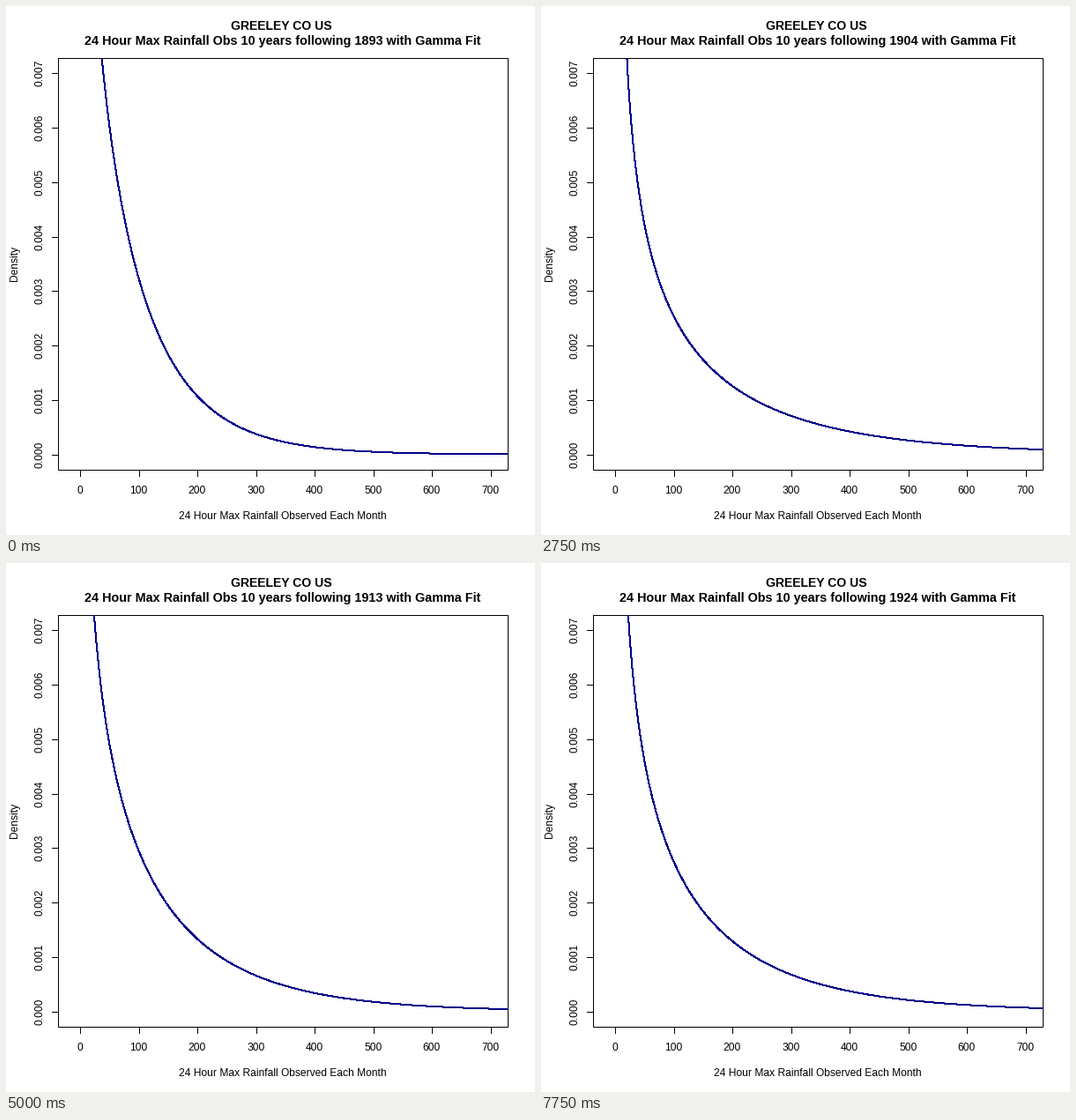
A matplotlib script that plays this animation: 600x600 px, repeating every 8000 ms.

```python
import math

import numpy as np
import matplotlib.pyplot as plt
from matplotlib.animation import FuncAnimation
from matplotlib.patches import Rectangle

SIZE, DPI = 600, 100
FRAMES, INTERVAL = 32, 250
FIRST_YEAR = 1893
LEFT, TOP, RIGHT, BOTTOM = 59, 59, 569, 526

# Fitted gamma shape and scale at a few years, blended linearly between them
KEY_STEPS = [0, 4, 8, 15, 20, 24, 31]
SHAPES = [0.80, 0.70, 0.62, 0.47, 0.685, 0.85, 0.617]
SCALES = [103.7, 176, 235, 283, 174, 134, 205]

plt.rcParams["font.family"] = "Liberation Sans"
fig = plt.figure(figsize=(SIZE / DPI, SIZE / DPI), dpi=DPI, facecolor="white")
ax = fig.add_axes([0, 0, 1, 1])
ax.set_xlim(0, SIZE)
ax.set_ylim(SIZE, 0)
ax.axis("off")


def pt(px):
    return px * 72 / DPI


def to_x(value):
    return 85 + 0.6651 * value


def to_y(density):
    return 508.7 - 61786 * density


def line(xs, ys):
    # Pixel centres without snapping keep one-pixel lines crisp
    ax.plot(np.array(xs) + 0.5, np.array(ys) + 0.5, color="black", lw=pt(1),
            snap=False, solid_capstyle="projecting", solid_joinstyle="miter")


def label(x, y, text, size=12, **style):
    return ax.text(x, y, text, fontsize=pt(size), ha="center", va="baseline",
                   rotation_mode="anchor", color="black", **style)


def gamma_density(x, shape, scale):
    norm = math.gamma(shape) * scale ** shape
    return x ** (shape - 1) * np.exp(-x / scale) / norm


line([LEFT, RIGHT, RIGHT, LEFT, LEFT], [TOP, TOP, BOTTOM, BOTTOM, TOP])
for value in range(0, 701, 100):
    x = math.floor(to_x(value) - 0.5)
    line([x, x], [BOTTOM, BOTTOM + 7])
    label(x - 0.5, 553, str(value))
for k in range(8):
    y = round(to_y(k / 1000))
    line([LEFT - 7, LEFT], [y, y])
    label(42, y - 0.5, f"{k / 1000:.3f}", rotation=90)

label(314, 582, "24 Hour Max Rainfall Observed Each Month")
label(13, 292, "Density", rotation=90)
label(312, 27, "GREELEY CO US", 14, weight="bold")
title = label(313.7, 44, "", 14.4, weight="bold")

# Every touched pixel is filled when aliased, so one pixel draws as two
curve, = ax.plot([], [], color="#00008b", lw=pt(1), antialiased=False, zorder=3)
curve.set_clip_path(Rectangle((LEFT, TOP), RIGHT + 1 - LEFT, BOTTOM + 1 - TOP,
                              transform=ax.transData))
amounts = np.linspace(5, 730, 600)


def draw(i):
    shape = np.interp(i, KEY_STEPS, SHAPES)
    scale = np.interp(i, KEY_STEPS, SCALES)
    curve.set_data(to_x(amounts), to_y(gamma_density(amounts, shape, scale)))
    title.set_text(f"24 Hour Max Rainfall Obs 10 years following "
                   f"{FIRST_YEAR + i} with Gamma Fit")
    return curve, title


anim = FuncAnimation(fig, draw, frames=FRAMES, interval=INTERVAL,
                     repeat=True, repeat_delay=0)
plt.show()
```
